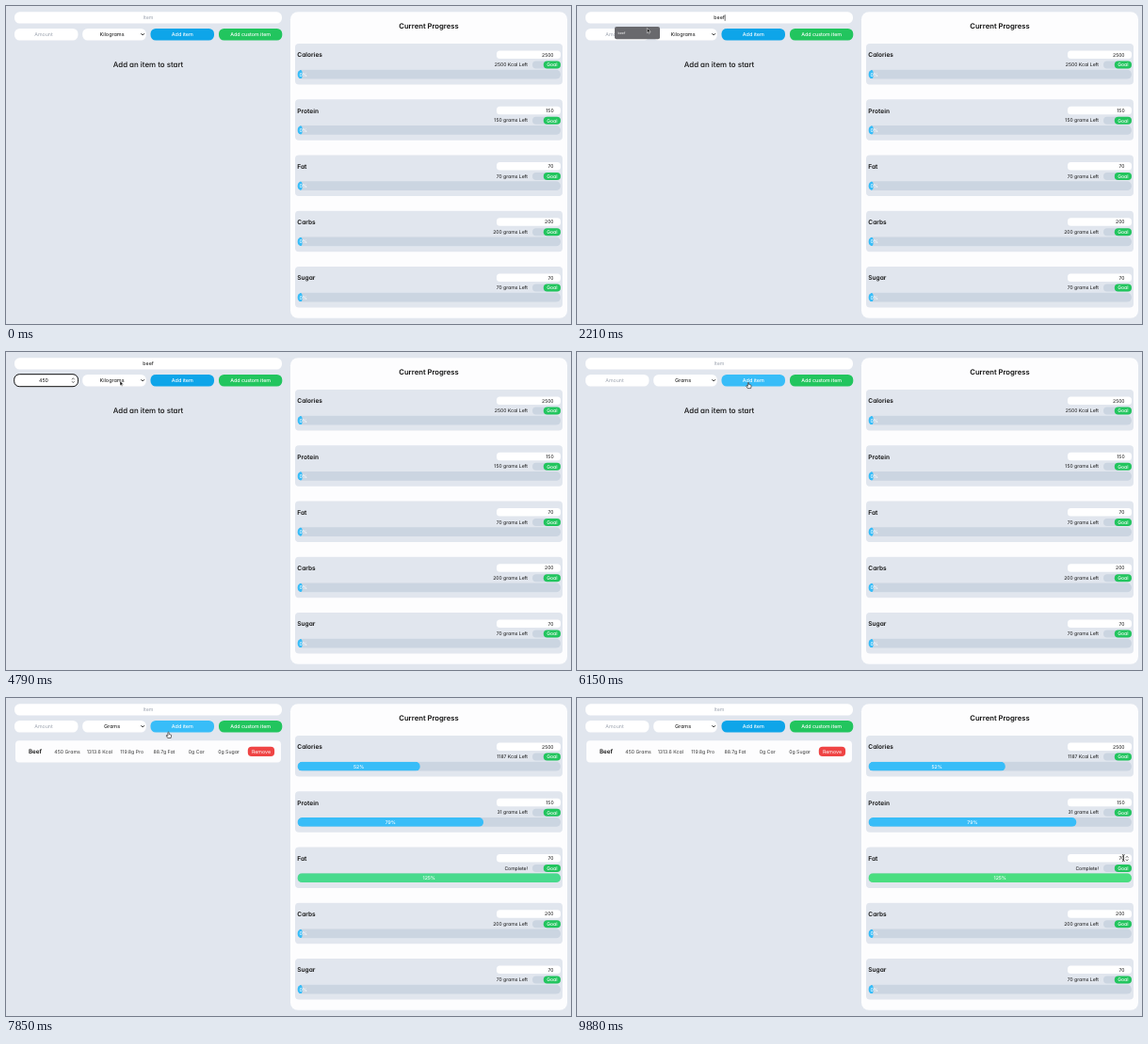
Write an HTML page that moves like this. It is 600 px wide and 338 px high and loops after 10000 ms.

```html
<!DOCTYPE html>
<html lang="en">
<head>
<meta charset="utf-8">
<title>Nutrition tracker</title>
<style>
  html, body { margin: 0; width: 100%; height: 100%; overflow: hidden; background: #e1e6ee; }
  svg { display: block; width: 100vw; height: 100vh; }
  text {
    font-family: Inter, "Open Sans", sans-serif;
    font-feature-settings: "cv11";
    text-rendering: geometricPrecision;
    white-space: pre;
  }
</style>
</head>
<body>
<svg id="stage" viewBox="0 0 600 338"></svg>
<script>
const LOOP = 10000;
const COLORS = {
  page: '#e1e6ee', track: '#cbd5e1', panel: '#fdfdfe', ink: '#111', hint: '#9ca3af',
  sky: [14, 165, 233], skyLight: [56, 189, 248], green: '#22c55e', mint: [74, 222, 128], red: '#ef4444'
};
const stage = document.getElementById('stage');

function add(tag, attrs, parent = stage) {
  const el = document.createElementNS('http://www.w3.org/2000/svg', tag);
  for (const key in attrs) el.setAttribute(key, attrs[key]);
  parent.append(el);
  return el;
}

const box = (x, y, width, height, rx, fill, parent) =>
  add('rect', { x, y, width, height, rx, fill }, parent);

// cy is the middle of the capital letters
function label(str, x, cy, size, { anchor = 'middle', weight = 400, fill = COLORS.ink, parent = stage } = {}) {
  const el = add('text', {
    x, y: cy + size * 0.36, 'font-size': size, 'text-anchor': anchor, 'font-weight': weight, fill
  }, parent);
  el.textContent = str;
  return el;
}

const line = (d, parent, width = 0.8, stroke = '#111') =>
  add('path', { d, fill: 'none', stroke, 'stroke-width': width, 'stroke-linecap': 'round', 'stroke-linejoin': 'round' }, parent);

const show = (el, on) => el.setAttribute('display', on ? 'inline' : 'none');
const clamp = (v, lo = 0, hi = 1) => Math.min(hi, Math.max(lo, v));
const lerp = (a, b, p) => a + (b - a) * p;
const mix = (a, b, p) => `rgb(${a.map((v, i) => Math.round(lerp(v, b[i], p)))})`;
const set = (el, str) => { if (el.textContent !== str) el.textContent = str; };

// CSS "ease" curve
function ease(x) {
  if (x <= 0 || x >= 1) return clamp(x);
  const bez = (s, a, b) => 3 * (1 - s) ** 2 * s * a + 3 * (1 - s) * s * s * b + s ** 3;
  let lo = 0, hi = 1;
  for (let i = 0; i < 24; i++) {
    const mid = (lo + hi) / 2;
    if (bez(mid, 0.25, 0.25) < x) lo = mid; else hi = mid;
  }
  return bez(lo, 0.1, 1);
}

// Last step whose time has come
function stepAt(steps, t) {
  let value = steps[0][1];
  for (const [time, v] of steps) if (t >= time) value = v;
  return value;
}

// Form
box(9, 6.3, 284, 12.3, 5.5, '#fff');
const itemText = label('', 151, 12.5, 5.3);
box(9, 24, 67.5, 12.6, 5.5, '#fff');
const amountText = label('', 40, 30.2, 5.3);
const amountFocus = add('g', {});
add('rect', { x: 8.7, y: 23.7, width: 67.8, height: 13, rx: 5.5, fill: 'none', stroke: '#111', 'stroke-width': 1 }, amountFocus);
line('M70.2 29 l1.1 -1.3 l1.1 1.3 M70.2 31.4 l1.1 1.3 l1.1 -1.3', amountFocus, 0.7, '#444');
box(81.2, 24, 67.6, 12.6, 5.5, '#fff');
const unitText = label('', 112.5, 30.2, 5.5);
line('M143.7 29.5 l1.5 1.5 l1.5 -1.5', stage, 0.9);
const addButton = box(153.5, 24, 67.5, 12.6, 5.5, mix(COLORS.sky, COLORS.sky, 0));
label('Add item', 187.3, 30.2, 5.4, { fill: '#fff', weight: 500 });
box(226, 24, 67.3, 12.6, 5.5, COLORS.green);
label('Add custom item', 259.6, 30.2, 5.3, { fill: '#fff', weight: 500 });
const emptyText = label('Add an item to start', 151, 61.7, 7.9, { weight: 500 });

// Added item
const entry = add('g', {});
box(10, 45.2, 282, 23.3, 4, '#fdfdfe', entry);
label('Beef', 31, 57, 6.3, { weight: 600, parent: entry });
['450 Grams', '1313.6 Kcal', '119.8g Pro', '88.7g Fat', '0g Car', '0g Sugar'].forEach((str, i) =>
  label(str, 65 + i * 34.3, 56.9, 5.2, { fill: '#333', parent: entry }));
box(256.8, 51.7, 28.3, 10.2, 4, COLORS.red, entry);
label('Remove', 271, 56.9, 5.3, { fill: '#fff', parent: entry });

// Progress panel
box(302, 6.2, 294, 325.6, 8, COLORS.panel);
label('Current Progress', 449, 21, 7.7, { weight: 600 });

const BAR = { x: 309.5, w: 279.5, min: 5 };
const meters = [
  { name: 'Calories', goal: 2500, left: '2500 Kcal Left', after: '1187 Kcal Left', pct: 52 },
  { name: 'Protein', goal: 150, left: '150 grams Left', after: '31 grams Left', pct: 79 },
  { name: 'Fat', goal: 70, left: '70 grams Left', after: 'Complete!', pct: 125 },
  { name: 'Carbs', goal: 200, left: '200 grams Left', after: '200 grams Left', pct: 0 },
  { name: 'Sugar', goal: 70, left: '70 grams Left', after: '70 grams Left', pct: 0 }
];
meters.forEach((m, i) => {
  const y = 40 + i * 59.25;
  box(307, y, 284, 43.6, 4, COLORS.page);
  label(m.name, 309.3, y + 12, 6.6, { anchor: 'start', weight: 600 });
  box(521, y + 7.5, 68, 8.6, 3.5, '#fff');
  label(m.goal, 581.6, y + 11.8, 5.1, { anchor: 'end' });
  m.leftText = label(m.left, 554, y + 22.4, 5.1, { anchor: 'end' });
  box(559, y + 18.5, 30, 8, 4, COLORS.track);
  box(570.8, y + 18.5, 18.2, 8, 4, COLORS.green);
  label('Goal', 579.9, y + 22.5, 5.1, { fill: '#fff', weight: 500 });
  box(BAR.x, y + 27.8, BAR.w, 9.8, 4.9, COLORS.track);
  const clip = add('clipPath', { id: 'bar' + i });
  box(BAR.x, y + 27.8, BAR.w, 9.8, 4.9, '#000', clip);
  const holder = add('g', { 'clip-path': `url(#bar${i})` });
  m.fill = box(BAR.x, y + 27.8, BAR.min, 9.8, 2.5, '#38bdf8', holder);
  m.pctText = label('0%', 315.6, y + 32.7, 5.1, { fill: '#fff', weight: 500 });
});

// Number arrows that appear under the pointer
const spinner = line('M583 169.5 l1.1 -1.3 l1.1 1.3 M583 171.7 l1.1 1.3 l1.1 -1.3', stage, 0.7, '#444');

// Suggestion popup, caret, pointers
const popup = add('g', {});
box(40, 22, 48, 13.3, 2, '#69696d', popup);
label('beef', 43.5, 28.6, 3.6, { anchor: 'start', fill: '#fff', parent: popup });
const caret = box(0, 0, 0.6, 6.6, 0, '#111');

const pointers = { arrow: add('g', {}), hand: add('g', {}), beam: add('g', {}) };
add('path', {
  d: 'M0 0 V5.2 L1.2 4.1 L2 5.9 L2.9 5.5 L2.1 3.8 H3.7 Z',
  fill: '#111', stroke: '#fff', 'stroke-width': 0.5, 'stroke-linejoin': 'round'
}, pointers.arrow);
add('path', {
  d: 'M-.6 .4 Q0 -.4 .6 .4 V2.3 L2.6 2.8 Q3.2 3 3.1 3.7 L2.6 6.3 H-.8 L-2.4 3.8 Q-2.2 3 -1.4 3.5 L-.6 4.2 Z',
  fill: '#fff', stroke: '#111', 'stroke-width': 0.6, 'stroke-linejoin': 'round'
}, pointers.hand);
line('M-1 -3.4 Q0 -3.4 0 -2.6 Q0 -3.4 1 -3.4 M0 -2.6 V2.6 M-1 3.4 Q0 3.4 0 2.6 Q0 3.4 1 3.4', pointers.beam, 0.7);

const PATH = [
  [30, -6, 70], [970, 75, 13], [2090, 75, 13], [2200, 74.5, 23.5], [2550, 36, 30],
  [3790, 36, 30], [4700, 121, 30.5], [5000, 121, 31], [5400, 124, 45], [5800, 180, 33], [6000, 182, 32.3],
  [7600, 182, 32.3], [7850, 172.5, 36.2], [8200, 120, 58], [8690, 294, 90], [9200, 490, 150],
  [9640, 582, 170], [9730, 582, 170], [9880, 580.3, 170], [10000, 580.3, 170]
];
const POINTER = [
  [0, ''], [30, 'arrow'], [960, 'beam'], [1390, ''], [2090, 'arrow'], [2400, 'beam'],
  [3360, ''], [3790, 'beam'], [4250, 'arrow'], [5660, 'hand'], [7880, 'arrow'], [9520, 'beam']
];
const ITEM = [[0, ''], [1390, 'b'], [1730, 'be'], [1910, 'bee'], [2090, 'beef'], [6060, '']];
const AMOUNT = [[0, ''], [3360, '4'], [3550, '45'], [3790, '450'], [6060, '']];
const UNIT = [[0, 'Kilograms'], [5400, 'Grams']];
const CARET = [[0, ''], [1150, 'item'], [2550, 'amount'], [3090, ''], [3360, 'amount'], [4290, '']];
const ADDED = 6630;

function pointerAt(t) {
  const i = Math.max(1, PATH.findIndex(k => k[0] > t));
  const [t0, x0, y0] = PATH[i - 1], [t1, x1, y1] = PATH[i];
  const p = clamp((t - t0) / (t1 - t0));
  const s = p * p * (3 - 2 * p);
  return [lerp(x0, x1, s), lerp(y0, y1, s)];
}

function field(el, value, hint) {
  set(el, value || hint);
  el.setAttribute('fill', value ? COLORS.ink : COLORS.hint);
}

function drawCaret(t) {
  const where = stepAt(CARET, t);
  show(caret, where);
  if (!where) return;
  const inItem = where === 'item';
  const value = stepAt(inItem ? ITEM : AMOUNT, t);
  const width = value ? (inItem ? itemText : amountText).getComputedTextLength() : 0;
  caret.setAttribute('x', (inItem ? 151 : 40) + width / 2 + 0.1);
  caret.setAttribute('y', inItem ? 9.2 : 26.9);
}

function drawMeter(m, p, added) {
  set(m.leftText, added ? m.after : m.left);
  set(m.pctText, (added ? m.pct : 0) + '%');
  const end = Math.max(BAR.min, BAR.w * m.pct / 100);
  const w = Math.min(BAR.w, lerp(BAR.min, end, p));
  const done = m.pct >= 100;
  m.fill.setAttribute('width', w);
  m.fill.setAttribute('rx', Math.min(done && p > 0 ? 1 : 4.9, w / 2));
  m.fill.setAttribute('fill', mix(COLORS.skyLight, done ? COLORS.mint : COLORS.skyLight, p));
  m.pctText.setAttribute('x', Math.max(315.6, BAR.x + w / 2));
}

function draw(t) {
  const added = t >= ADDED;
  field(itemText, stepAt(ITEM, t), 'Item');
  field(amountText, stepAt(AMOUNT, t), 'Amount');
  set(unitText, stepAt(UNIT, t));
  show(amountFocus, t >= 2550 && t < 4850);
  show(popup, t >= 1150 && t < 2550);
  drawCaret(t);

  const hover = ease((t - 5660) / 150) - ease((t - 7880) / 150);
  addButton.setAttribute('fill', mix(COLORS.sky, COLORS.skyLight, hover));
  show(emptyText, !added);
  show(entry, added);
  const p = ease((t - ADDED) / 2000);
  meters.forEach(m => drawMeter(m, p, added));

  const [x, y] = pointerAt(t);
  const kind = stepAt(POINTER, t);
  for (const name in pointers) show(pointers[name], name === kind);
  if (kind) pointers[kind].setAttribute('transform', `translate(${x} ${y})`);
  show(spinner, t >= 9520);
}

const start = performance.now();
function tick() {
  draw((performance.now() - start) % LOOP);
  requestAnimationFrame(tick);
}
tick();
</script>
</body>
</html>
```
